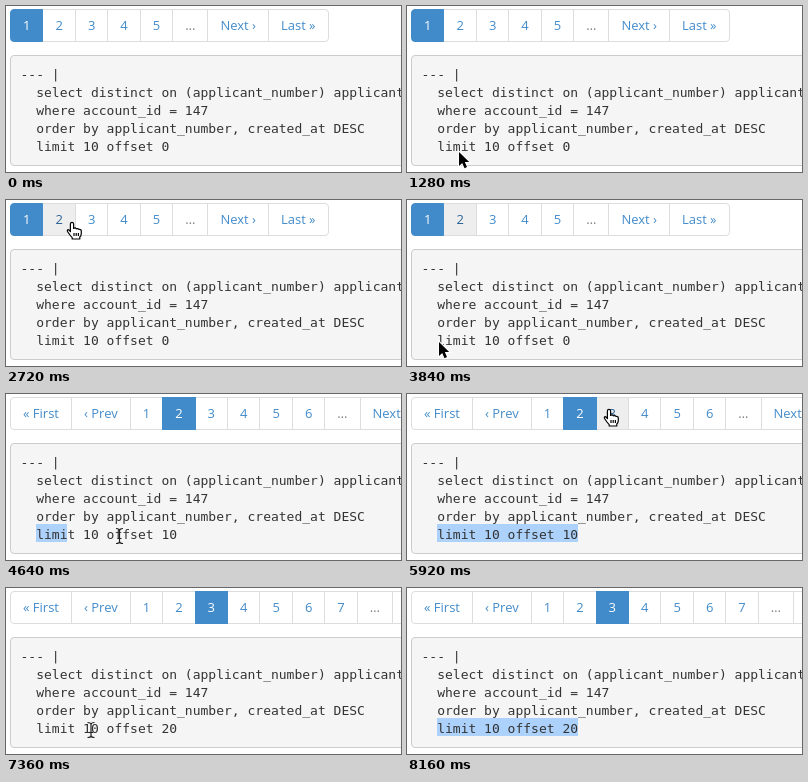
These frames come from a looping animation (395 px wide and 166 px high, 8480 ms). An HTML page:

```html
<!DOCTYPE html>
<html lang="en">
<head>
<meta charset="utf-8">
<title>Pagination</title>
<style>
  html, body { margin: 0; width: 100%; height: 100%; overflow: hidden; background: #fff; }
  #stage { position: relative; width: 395px; height: 166px; overflow: hidden; }
  #pager {
    position: absolute; left: 4px; top: 3px; display: flex;
    font: 13px/18.57px "Open Sans", "Noto Sans", sans-serif; white-space: nowrap; color: #428bca;
  }
  #pager span { padding: 6px 12px; border: 1px solid #ddd; margin-left: -1px; background: #fff; }
  #pager span:first-child { margin-left: 0; border-radius: 4px 0 0 4px; }
  #pager span:last-child { border-radius: 0 4px 4px 0; }
  #pager .gap { color: #777; }
  #pager .hover { color: #2a6496; background: #eee; }
  #pager .active { position: relative; color: #fff; background: #428bca; border-color: #428bca; }
  pre {
    position: absolute; left: 4px; top: 49px; z-index: 0; box-sizing: border-box;
    width: 600px; height: 111px; margin: 0; padding: 10px 9.5px;
    border: 1px solid #ccc; border-radius: 4px; background: #f5f5f5; color: #333;
    font: 13px/18px "DejaVu Sans Mono", monospace;
  }
  #selection {
    position: absolute; z-index: -1; left: calc(9.5px + 2ch); top: 80px; height: 18px; background: #acd1fb;
  }
  svg { position: absolute; left: 0; top: 0; z-index: 1; }
  #arrow { fill: #000; stroke: #fff; paint-order: stroke; stroke-width: 2; }
  #hand { fill: #fff; stroke: #000; stroke-width: 1.2; stroke-linejoin: round; }
  #beam { fill: none; stroke: #222; stroke-width: 1.2; }
</style>
</head>
<body>
<div id="stage">
  <div id="pager"></div>
  <pre><div id="selection"></div>--- |
  select distinct on (applicant_number) applicants.*
  where account_id = 147
  order by applicant_number, created_at DESC
  limit 10 offset <b id="offset" style="font-weight:normal">0</b></pre>
  <svg width="395" height="166">
    <path id="arrow" d="M0 0V14L3.2 11L5.5 16.2L8 15.1L5.8 10H10.2Z"/>
    <g id="hand">
      <path d="M-1.6 1.9Q-1.6 .4 0 .4T1.6 1.9V6.5Q3 5.2 4.4 6.8Q6 6 7.1 7.5Q9.3 7.2 9.3 9.3V11.5Q9.3 13.5 7.8 15V17H.2V15.6Q-2 13.5-4.3 9.8Q-5.2 8-3.9 7.7Q-2.9 7.7-1.6 9.7Z"/>
      <path d="M2 11V14M4.2 11V14M6.4 11V14"/>
    </g>
    <path id="beam" d="M-3.5-7.5Q0-7.5 0-5.5Q0-7.5 3.5-7.5M0-5.5V5.5M-3.5 7.5Q0 7.5 0 5.5Q0 7.5 3.5 7.5M-2 2.5H2"/>
  </svg>
</div>
<script>
const LOOP = 8480, TICK = 160;
const el = id => document.getElementById(id);

// Cursor waypoints: tick, shape, x, y
const path = [
  [0, "", 180, 158], [5, "arrow", 180, 158], [8, "arrow", 52, 146], [10, "arrow", 24, 137],
  [13, "arrow", 25, 137], [15, "arrow", 88, 72], [16, "arrow", 84, 40],
  [17, "hand", 66, 22], [18, "hand", 62, 20], [19, "hand", 62, 20],
  [20, "arrow", 60, 40], [22, "arrow", 45, 112], [24, "arrow", 32, 142], [25, "arrow", 31, 141],
  [26, "beam", 33, 142], [27, "beam", 33, 142], [28, "beam", 61, 142], [29, "beam", 113.5, 142],
  [30, "beam", 162, 143], [32, "beam", 189, 143], [33, "beam", 189, 143],
  [34, "arrow", 192, 112], [36, "arrow", 206, 32], [37, "hand", 202, 15], [38, "hand", 202, 15],
  [39, "arrow", 190, 38], [42, "arrow", 55, 128], [43, "arrow", 35, 139], [44, "arrow", 30, 141],
  [45, "beam", 32, 142], [46, "beam", 85, 142], [47, "beam", 165, 143], [48, "beam", 208, 144],
  [49, "beam", 208, 144], [50, "beam", 208, 159], [51, "", 208, 175]
];
// Selected characters: tick, count
const selected = [[0, 0], [29, 4], [30, 11], [31, 17], [32, 18], [44, 0], [47, 8], [48, 18]];
const pages = [[0, 1], [25, 2], [44, 3]];
const hovers = [[0, 0], [17, 2], [25, 0], [37, 3], [44, 0]];

const latest = (list, tick) => list.filter(item => item[0] <= tick).pop();

function drawPager(page, hover) {
  const count = page < 2 ? 5 : page + 4;
  const numbers = Array.from({ length: count }, (_, i) => i + 1);
  const labels = [...(page > 1 ? ["« First", "‹ Prev"] : []), ...numbers, "…", "Next ›", "Last »"];
  const style = label =>
    label === page ? "active" : label === hover ? "hover" : label === "…" ? "gap" : "";
  el("pager").innerHTML = labels.map(l => `<span class="${style(l)}">${l}</span>`).join("");
  el("offset").textContent = (page - 1) * 10;
}

function drawCursor(tick) {
  const from = latest(path, tick);
  const to = path[path.indexOf(from) + 1] || from;
  const k = (tick - from[0]) / (to[0] - from[0] || 1);
  const [x, y] = [2, 3].map(i => from[i] + (to[i] - from[i]) * k);
  for (const shape of ["arrow", "hand", "beam"]) {
    el(shape).style.display = shape === from[1] ? "" : "none";
    el(shape).setAttribute("transform", `translate(${x} ${y})`);
  }
}

let shown = -1;
function frame(now) {
  const tick = Math.floor((now % LOOP) / TICK);
  if (tick !== shown) {
    shown = tick;
    drawPager(latest(pages, tick)[1], latest(hovers, tick)[1]);
    el("selection").style.width = latest(selected, tick)[1] + "ch";
    drawCursor(tick);
  }
  requestAnimationFrame(frame);
}
frame(0);
</script>
</body>
</html>
```
